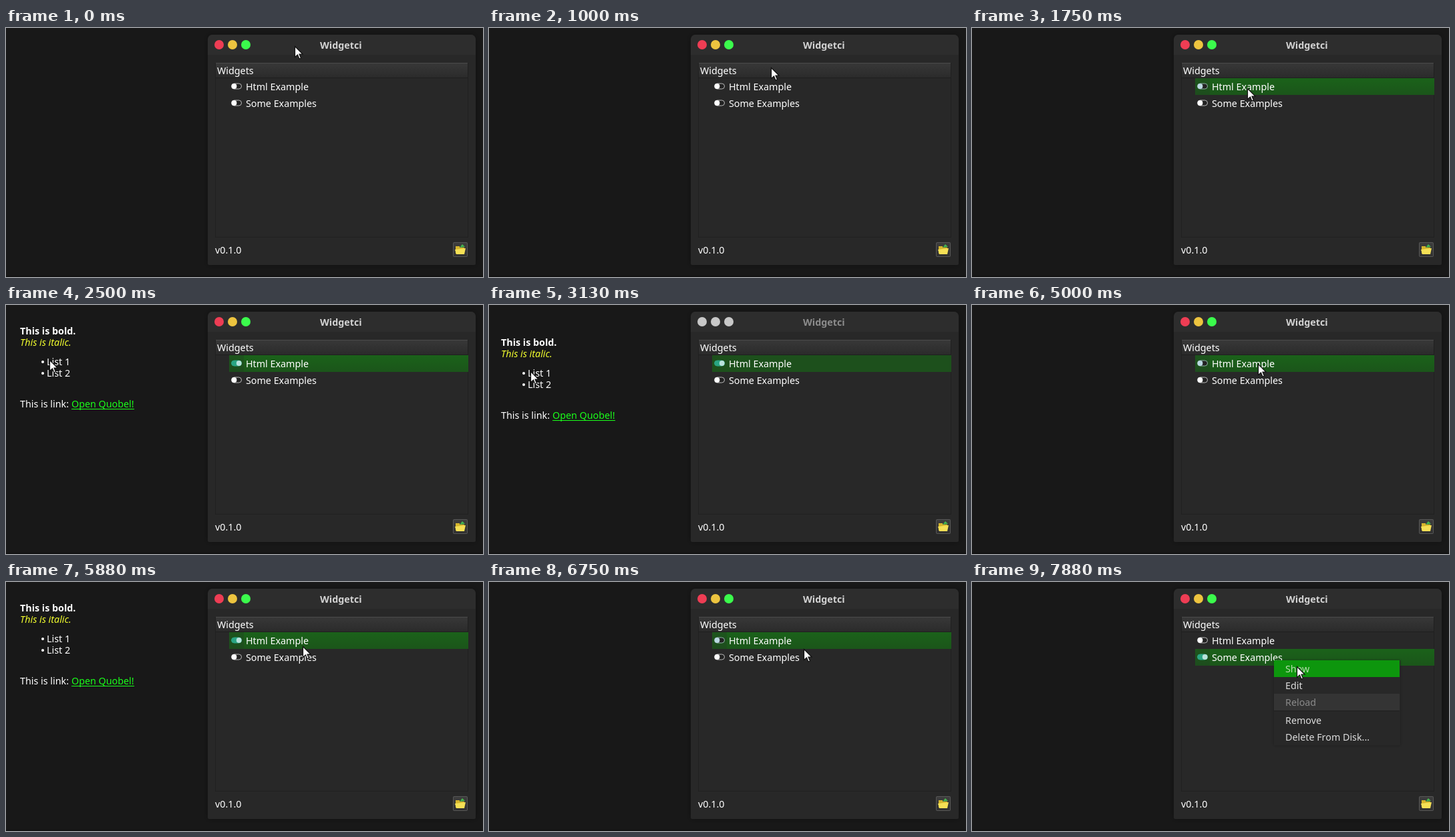
Animation, 714 px wide and 372 px high, one loop 8000 ms. Source, as an HTML page with a canvas:

```html
<!DOCTYPE html>
<html lang="en">
<head>
<meta charset="utf-8">
<title>Desktop widgets</title>
<style>
html, body { margin: 0; width: 714px; height: 372px; overflow: hidden; background: #181818; }
canvas { display: block; }
</style>
</head>
<body>
<canvas id="stage" width="714" height="372"></canvas>
<script>
const ctx = document.getElementById('stage').getContext('2d');
const LOOP = 8000, STEP = 125, GLIDE = 500, ROW = 25;
const FONT = '14.3px "Noto Sans", "Open Sans", sans-serif';
const DRAG = { start: 2750, end: 4250 };

// Pointer stops: arrival time and place; each is reached by an eased glide
const stops = [
  { at: 1250, x: 412, y: 90 },
  { at: 2500, x: 65, y: 82 },
  { at: 4750, x: 428, y: 88 },
  { at: 6000, x: 447, y: 97 },
  { at: 6500, x: 471, y: 100 },
  { at: 7250, x: 452, y: 117 },
  { at: 7750, x: 486, y: 126 }
];

const between = (t, a, b) => t >= a && t < b;
const clamp = u => Math.max(0, Math.min(1, u));
const ease = u => u * u * (3 - 2 * u);

function pointerAt(t) {
  let x = 432, y = 27;
  for (const stop of stops) {
    const k = ease(clamp((t - stop.at) / GLIDE + 1));
    x += (stop.x - x) * k;
    y += (stop.y - y) * k;
  }
  return [Math.round(x), Math.round(y)];
}

// The widget is dragged down and back while swaying sideways
function widgetAt(t) {
  const u = clamp((t - DRAG.start) / (DRAG.end - DRAG.start)) ** 0.75;
  return [
    Math.round(21 - 4 * Math.sin(2 * Math.PI * u)),
    Math.round(39 + 19 * Math.sin(Math.PI * u))
  ];
}

function box(x, y, w, h, fill) {
  ctx.fillStyle = fill;
  ctx.fillRect(x, y, w, h);
}

function round(x, y, w, h, r, fill) {
  ctx.beginPath();
  ctx.roundRect(x, y, w, h, r);
  ctx.fillStyle = fill;
  ctx.fill();
}

function dot(x, y, r, fill) {
  ctx.beginPath();
  ctx.arc(x, y, r, 0, Math.PI * 2);
  ctx.fillStyle = fill;
  ctx.fill();
}

function poly(points, fill) {
  ctx.beginPath();
  points.forEach(([x, y]) => ctx.lineTo(x, y));
  ctx.closePath();
  ctx.fillStyle = fill;
  ctx.fill();
}

function text(str, x, y, color = '#fff', style = '') {
  ctx.font = `${style} ${FONT}`;
  ctx.fillStyle = color;
  ctx.fillText(str, x, y);
  return Math.round(ctx.measureText(str).width);
}

function fade(y, h, top, bottom) {
  const g = ctx.createLinearGradient(0, y, 0, y + h);
  g.addColorStop(0, top);
  g.addColorStop(1, bottom);
  return g;
}

function shadowed(blur, paint) {
  ctx.save();
  ctx.shadowColor = 'rgba(0,0,0,.3)';
  ctx.shadowBlur = blur;
  paint();
  ctx.restore();
}

function toggle(y, on, tinted) {
  const line = on ? '#2aa583' : tinted ? '#8fb3a6' : '#bbb';
  ctx.beginPath();
  ctx.roundRect(337.5, y - 4, 15, 8, 4);
  ctx.fillStyle = on ? line : '#222';
  ctx.fill();
  ctx.strokeStyle = line;
  ctx.lineWidth = 1;
  ctx.stroke();
  dot(on ? 348.7 : 341.5, y, 3.9, on ? '#b9e2dc' : tinted ? '#bad8e2' : '#fff');
}

function row(label, i, { selected, focused, on }) {
  const y = 75 + ROW * i, lit = selected === i && focused;
  if (selected === i) box(334, y, 358, ROW, focused ? fade(y, ROW, '#1b621a', '#1b551a') : '#1d501c');
  if (lit) box(334, y, 22, ROW, 'rgba(32,60,36,.35)');
  toggle(y + 12, on[i], lit);
  text(label, 359, y + 18);
}

function folder() {
  round(669, 320, 22, 22, 2, '#575757');
  round(670, 321, 20, 20, 1, fade(321, 20, '#3d3d3d', '#303030'));
  box(673, 326, 6, 3, '#d5b52c');
  box(673, 328, 13, 9, '#d5b52c');
  poly([[672, 331], [688, 329], [686, 338], [674, 338]], '#f5e055');
  poly([[679, 328], [683, 323], [687, 327]], '#45b44f');
}

function appWindow(state) {
  const { focused } = state;
  shadowed(8, () => round(302, 10, 401, 344, [7, 7, 2, 2], '#282828'));
  round(302, 10, 401, 30, [7, 7, 0, 0], '#2d2d2d');
  ['#ee3d54', '#edc43f', '#3bfb4c'].forEach((c, i) => dot(319 + 20 * i, 25, 7, focused ? c : '#c8c8c8'));
  text('Widgetci', 470, 31, focused ? '#d2d2d2' : '#8c8c8c', 'bold');

  box(313, 52, 379, 261, '#202020');
  box(314, 52, 377, 260, '#282828');
  box(314, 52, 377, 22, fade(52, 22, '#383838', '#2b2b2b'));
  box(314, 52, 377, 1, '#4b4b4b');
  box(314, 74, 377, 1, '#1f1f1f');
  text('Widgets', 316, 69);
  ['Html Example', 'Some Examples'].forEach((label, i) => row(label, i, state));

  text('v0.1.0', 313, 337);
  folder();
}

function widget(x, y) {
  text('This is bold.', x, y + 5, '#fff', 'bold');
  text('This is italic.', x, y + 22, '#f3ff2e', 'italic');
  ['List 1', 'List 2'].forEach((item, i) => {
    dot(x + 34, y + 46 + 17 * i, 2, '#fff');
    text(item, x + 40, y + 51 + 17 * i);
  });
  const linkX = x + text('This is link: ', x, y + 114);
  const width = text('Open Quobel!', linkX, y + 114, '#1aff1a');
  box(linkX, y + 116, width, 1, '#1aff1a');
}

function menu(x, y, action, hover, reloadable) {
  shadowed(4, () => box(x, y, 189, 127, '#282828'));
  if (hover) box(x, y, 188, ROW, '#0d960d');
  if (!reloadable) box(x, y + 2 * ROW, 188, ROW, '#343434');
  box(x, y + 3 * ROW, 188, 1, '#1e1e1e');
  [action, 'Edit', 'Reload', 'Remove', 'Delete From Disk...'].forEach((label, i) => {
    const color = i === 2 && !reloadable ? '#8b8b8b' : i === 0 && hover ? '#b9dcb0' : '#dcdcdc';
    text(label, x + 17, y + 18 + ROW * i + (i > 2 ? 2 : 0), color);
  });
}

function pointer(x, y) {
  const arrow = new Path2D('M0 0V16L4 12.5L6.5 18.5L9 17.5L6.5 11.5H11.5Z');
  ctx.save();
  ctx.translate(x + 0.5, y + 0.5);
  ctx.fillStyle = '#fff';
  ctx.strokeStyle = '#111';
  ctx.lineWidth = 1.2;
  ctx.fill(arrow);
  ctx.stroke(arrow);
  ctx.restore();
}

function draw(t) {
  const place = widgetAt(t);
  const dragging = between(t, DRAG.start, DRAG.end);
  const htmlOn = between(t, 2000, 4875) || between(t, 5500, 6500);

  box(0, 0, 714, 372, '#181818');
  box(0, 370, 714, 2, '#121212');
  appWindow({
    focused: !between(t, 2875, 4750),
    selected: t < 1250 ? -1 : t < 7250 ? 0 : 1,
    on: [htmlOn, t >= 7875]
  });
  if (htmlOn) widget(...place);
  if (between(t, 6000, 6500)) menu(447, 97, 'Hide', t >= 6250, true);
  if (t >= 7375) menu(452, 117, 'Show', t >= 7500, false);
  if (dragging) pointer(place[0] + 44, place[1] + 43);
  else pointer(...pointerAt(t));
}

function tick() {
  const t = performance.now() % LOOP;
  draw(Math.floor(t / STEP) * STEP);
  requestAnimationFrame(tick);
}
tick();
</script>
</body>
</html>
```
